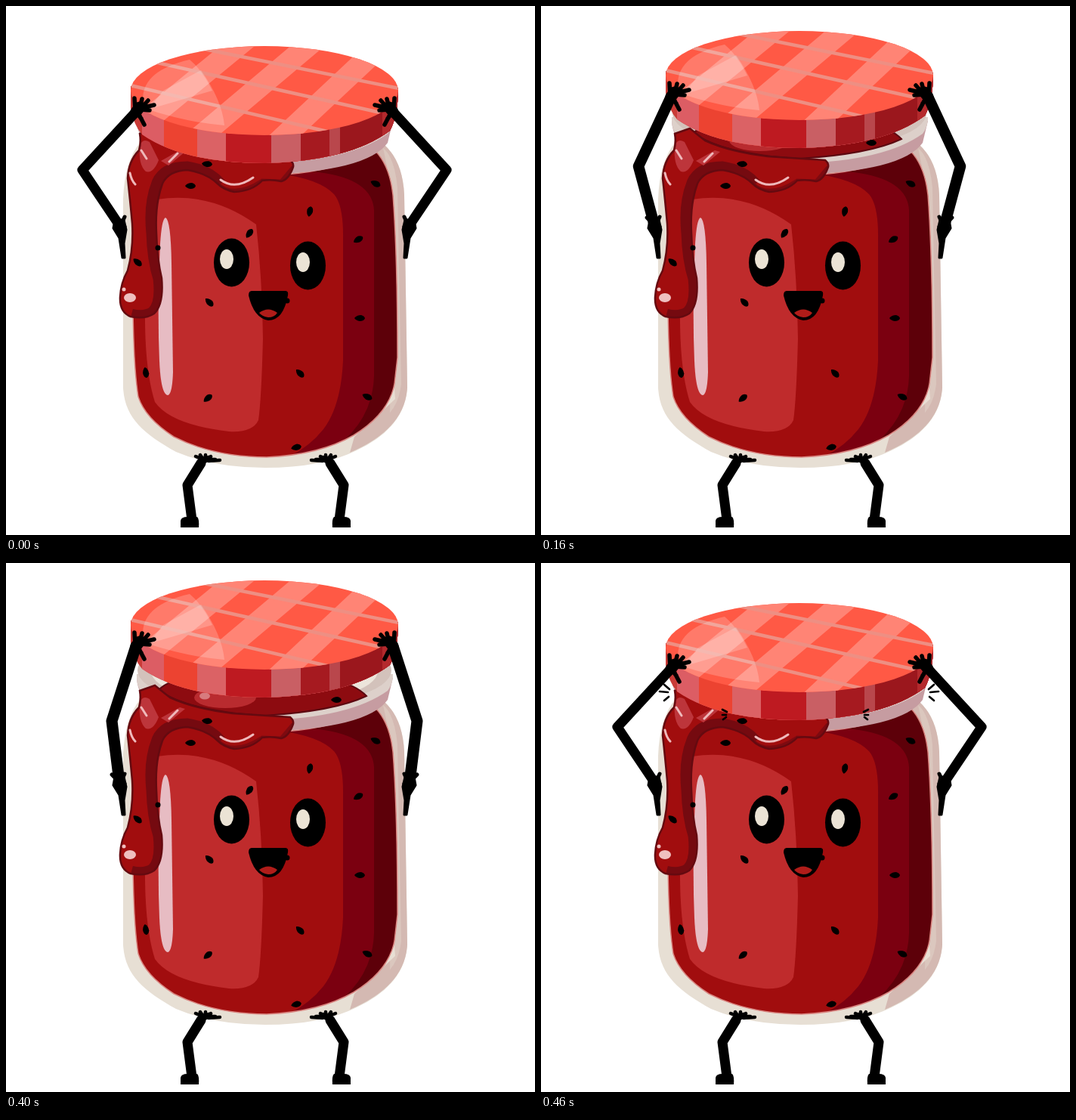
An HTML page for the animation above (0.54 s loop, 700 px wide and 700 px high).

```html
<!DOCTYPE html>
<html lang="en">
<head>
<meta charset="utf-8">
<title>Jam jar</title>
<style>
  html, body { margin: 0; width: 100%; height: 100%; overflow: hidden; background: #fff; }
  svg { display: block; width: 100%; height: 100%; }
  .limb { fill: none; stroke: #000; stroke-linecap: round; stroke-linejoin: round; }
  .gleam { fill: none; stroke: #efb9bb; stroke-linecap: round; stroke-width: 3; }
</style>
</head>
<body>
<svg viewBox="0 0 700 700">
  <defs>
    <clipPath id="jamClip"><path id="jamShape" d="M195 215Q169 250 168 400Q169 480 175 517C181 536 196 553 222 570Q275 597 345 597Q415 594 460 568Q507 539 514 500L518 465Q518 330 512 250Q508 212 489 192Q440 217 370 223Z"/></clipPath>
    <clipPath id="topClip"><ellipse cx="342" cy="112" rx="177" ry="59"/></clipPath>
    <clipPath id="sideClip"><path d="M165 106L165 135Q169 158 180 170Q235 208 343 208Q455 205 508 165Q519 145 519 108Z"/></clipPath>
    <clipPath id="dripClip"><path id="dripShape" d="M177 169L197 162Q208 171 217 178Q250 193 300 199L376 204Q381 208 380 213Q374 230 364 232Q351 229 339 231Q326 245 302 246Q288 243 281 236Q266 221 240 217Q215 218 207 235Q197 262 199 300Q200 335 206 360Q209 395 196 407Q184 415 165 411Q150 405 151 385Q152 366 161 350Q169 320 167 288Q164 255 161 228Q162 205 176 191Q179 180 177 169Z"/></clipPath>
    <g id="shoulder" class="limb" stroke-width="5">
      <path fill="#000" stroke-width="3" d="M144 283L142 294L150 307L154 333H157L156 314L159 296L156 283Z"/>
      <path d="M152 290L157 279M152 290L157 292M146 286L140 280"/>
    </g>
    <g id="hand" class="limb" stroke-width="5.500">
      <path stroke-width="15" d="M172 140L177 134"/>
      <path d="M171 139L170 122M177 135L180 123M179 135L188 125M179 135L196 131M178 137L190 138M174 140L183 157M172 140L179 149"/>
    </g>
    <g id="leg" class="limb">
      <path stroke-width="13" d="M258 605L240 634L246 680"/>
      <path stroke-width="4.500" d="M261 600L251 596M261 600L257 594M263 600L264 594M264 600L271 596M265 600L277 600M268 602L283 601M260 603L256 607"/>
      <path stroke-width="8" d="M257 604L267 599"/>
      <path fill="#000" stroke="none" d="M231 690V681Q232 676 240 676H253Q256 679 255 690Z"/>
    </g>
    <path id="spark" class="limb" stroke-width="2.700" d="M163 161L170 167M157 170L168 171M163 182L169 177"/>
    <path id="glint" class="limb" stroke-width="2.700" d="M240 194L246 197M240 201L245 201M241 207L245 204"/>
  </defs>

  <path fill="#e7dfd4" d="M173 147L178 180Q157 205 155 255V505C157 545 182 566 225 590Q275 611 343 611Q418 611 464 588Q528 558 531 505L527 250Q525 205 500 183L512 150Z"/>
  <path fill="#d4b9b2" d="M490 187L502 185Q525 207 527 250L531 505Q528 560 455 591L461 570L515 520Z"/>
  <path fill="#e7dfd4" d="M499 188Q514 200 518 240L523 500Q520 525 508 538L512 250Z" opacity=".35"/>

  <g clip-path="url(#jamClip)">
    <path fill="#a10d0e" d="M150 180H530V600H150Z"/>
    <path fill="#7b0010" d="M362 222Q415 229 434 249Q447 264 446 310V470Q443 530 420 560Q402 583 372 598H530V180Z"/>
    <path fill="#5d0009" d="M385 218Q484 221 487 270V490Q485 553 425 592H530V180Z"/>
    <path fill="#bf2b2c" d="M200 256Q270 245 331 289Q339 360 340 440Q338 520 334 548Q326 565 295 563Q218 554 197 524Q183 480 184 400Z"/>
  </g>
  <use href="#jamShape" fill="none" stroke="#d98580" stroke-width="1.5"/>
  <path fill="#e7bcc3" d="M211 280Q218 283 219 340L221 485Q220 514 214 515Q205 514 203 470Q200 400 204 315Q206 282 211 280Z"/>

  <path fill="#c69ca1" d="M173 152Q176 220 342 223Q478 219 505 181L512 152Z"/>
  <path fill="#ddd0ca" d="M173 147Q172 168 188 180Q245 208 342 208Q455 205 505 169Q512 160 512 147Z"/>
  <ellipse cx="342" cy="142" rx="168" ry="50" fill="#d3c2bb"/>
  <ellipse cx="342" cy="143" rx="150" ry="45" fill="#ece5db"/>
  <path fill="#8d0b10" stroke="#5c0810" stroke-width="2" d="M202 168Q225 143 342 142Q450 147 477 176Q435 196 342 202Q240 196 202 168Z"/>
  <ellipse cx="290" cy="178" rx="41" ry="14" fill="#b92b2f"/>
  <ellipse cx="263" cy="176" rx="7" ry="4.5" fill="#d77b7e"/>

  <use href="#shoulder"/>
  <use href="#shoulder" transform="matrix(-1 0 0 1 684 0)"/>

  <use href="#dripShape" fill="#a10d0e"/>
  <g clip-path="url(#dripClip)">
    <path fill="none" stroke="#750a10" stroke-width="23" d="M281 238Q266 221 240 217Q212 217 204 235Q193 262 197 300Q198 335 206 360Q210 395 197 408Q184 417 165 412"/>
    <path fill="none" stroke="#7e0a10" stroke-width="5" d="M281 236Q302 255 339 231L364 232L380 213"/>
    <path fill="#bd353b" d="M177 186Q180 174 190 180L202 204Q195 222 185 219Q175 210 177 186ZM205 205L230 191L237 193L215 211Z"/>
  </g>
  <use href="#dripShape" fill="none" stroke="#650a10" stroke-width="2.5"/>
  <path class="gleam" d="M179 191L186 202M164 221Q166 231 171 236M216 206L227 195M284 230Q303 244 327 227"/>
  <ellipse cx="164" cy="386" rx="8" ry="6" fill="#efbfbf"/>
  <circle cx="156" cy="375" r="2.5" fill="#efbfbf"/>

  <g id="seeds"></g>
  <ellipse cx="298.500" cy="339.500" rx="23.500" ry="32"/>
  <ellipse cx="399.500" cy="343.500" rx="23.500" ry="32"/>
  <ellipse cx="292" cy="335" rx="9" ry="13" fill="#ebe3d5"/>
  <ellipse cx="393" cy="339" rx="9" ry="13" fill="#ebe3d5"/>
  <path d="M325 377H370Q374 377 373 383Q367 416 347 416Q328 413 321 383Q321 377 325 377Z"/>
  <path fill="#b01c19" d="M335 406Q347 397 359 406Q355 412 347 412Q339 411 335 406Z"/>

  <use href="#leg"/>
  <use href="#leg" transform="matrix(-1 0 0 1 687 0)"/>

  <g id="lid">
    <g clip-path="url(#sideClip)" id="side"></g>
    <g clip-path="url(#topClip)">
      <path fill="#ff5945" d="M160 50H525V175H160Z"/>
      <path stroke="#ff8475" stroke-width="29" d="M322 40L150 181M418 37L240 187M503 46L343 196"/>
      <path stroke="#ee8f83" stroke-width="4.500" fill="none" d="M262 57L520 109M200 75L495 141M160 104L425 166"/>
      <path fill="#fff" opacity=".2" d="M181 122Q182 85 243 71Q260 85 273 112L188 137Z"/>
      <path fill="#fff" opacity=".2" d="M208 112L258 85Q286 125 289 158Q240 154 188 137Z"/>
    </g>
  </g>
  <g id="arms">
    <g id="arm"><path id="bone" class="limb"/><use id="grip" href="#hand"/></g>
    <use href="#arm" transform="matrix(-1 0 0 1 684 0)"/>
  </g>
  <g id="bursts">
    <use href="#spark"/>
    <use href="#spark" transform="matrix(-1 0 0 1 683 0)"/>
    <use href="#glint"/>
    <use href="#glint" transform="matrix(-1 0 0 1 673 0)"/>
  </g>
</svg>
<script>
const $ = id => document.getElementById(id);

// x, y, tilt
const seeds = [
  [266, 209, 5], [244, 238, 0], [322, 301, -55], [402, 272, -78], [489, 235, 25],
  [466, 309, -30], [468, 413, 0], [478, 517, 25], [389, 486, 45], [267, 519, -40],
  [185, 485, 80], [269, 392, 45], [384, 584, -15], [174, 339, 40], [437, 181, 0]
];
$('seeds').innerHTML = seeds.map(([x, y, a]) =>
  `<path transform="translate(${x} ${y}) rotate(${a})" d="M-7 0Q-4 -4 2 -4Q6 -3 7 0Q6 4 0 4Q-5 3 -7 0Z"/>`
).join('') + '<circle cx="201" cy="320" r="3.500"/><circle cx="372" cy="390" r="3.500"/>';

// Lid rim stripes: left edge and colour
const stripes = [
  [160, '#c93b37'], [180, '#dc5d64'], [209, '#ec4331'], [253, '#db6265'], [291, '#be1a21'],
  [351, '#c95f64'], [390, '#a61a20'], [428, '#b9474c'], [442, '#9b171d'], [498, '#b42a2d']
];
$('side').innerHTML = stripes.map(([x, c]) =>
  `<path fill="${c}" d="M${x} 100H525V212H${x}Z"/>`).join('');

const LOOP = 540;
const starts = [0, 80, 160, 240, 320, 400, 420, 440, 460];
// Elbow position and arm width for each lift level
const poses = [[101, 217, 13], [114, 215, 14], [129, 212, 14.5], [140, 209, 15], [148, 206, 15.5]];

function draw(ms) {
  const t = ms % LOOP;
  const step = starts.filter(s => s <= t).length - 1;
  const level = Math.min(step, 8 - step);
  const lift = -10 * level;
  const [x, y, w] = poses[level];
  const shift = `translate(0 ${lift})`;
  $('lid').setAttribute('transform', shift);
  $('grip').setAttribute('transform', shift);
  $('bone').setAttribute('d', `M172 ${140 + lift}L${x} ${y}L150 290`);
  $('bone').setAttribute('stroke-width', w);
  $('bursts').setAttribute('visibility', step === 8 ? 'visible' : 'hidden');
}

const begin = performance.now();
function tick() {
  draw(performance.now() - begin);
  requestAnimationFrame(tick);
}
draw(0);
requestAnimationFrame(tick);
</script>
</body>
</html>
```
